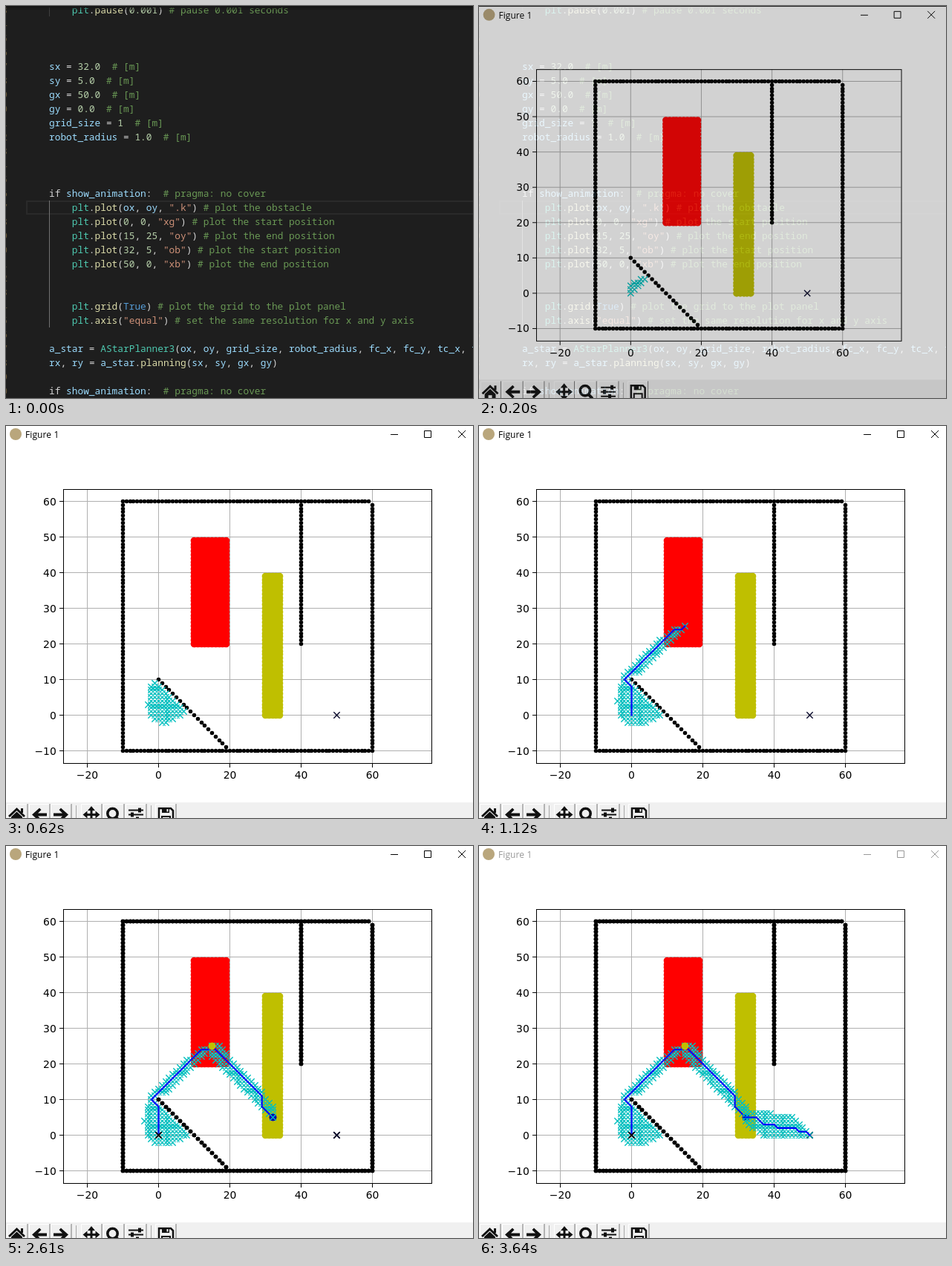
An HTML page for the animation above (3840 ms loop, 629 px wide and 528 px high).

```html
<!DOCTYPE html>
<html lang="en">
<head>
<meta charset="utf-8">
<title>Path planning</title>
<style>
html, body { margin: 0; width: 100%; height: 100%; overflow: hidden; background: #1e1e1e; }
svg { display: block; width: 629px; height: 528px; }
.code text { font: 12.82px "Noto Sans Mono", monospace; white-space: pre; }
.tick { font: 13.9px "DejaVu Sans", sans-serif; }
.title { font: 12px "Open Sans", sans-serif; letter-spacing: .1px; }
</style>
</head>
<body>
<svg id="stage" viewBox="0 0 629 528" xmlns="http://www.w3.org/2000/svg"></svg>
<script>
const LOOP = 3840;
const stage = document.getElementById('stage');

function add(parent, tag, attrs = {}, text) {
  const el = document.createElementNS('http://www.w3.org/2000/svg', tag);
  for (const k in attrs) el.setAttribute(k, attrs[k]);
  if (text !== undefined) el.textContent = text;
  parent.appendChild(el);
  return el;
}
const range = (a, b) => Array.from({ length: b - a + 1 }, (_, i) => a + i);

// ---- code editor ----
const lines = {
  '-4': '    plt.pause(0.001) # pause 0.001 seconds',
  0: 'sx = 32.0  # [m]',
  1: 'sy = 5.0  # [m]',
  2: 'gx = 50.0  # [m]',
  3: 'gy = 0.0  # [m]',
  4: 'grid_size = 1  # [m]',
  5: 'robot_radius = 1.0  # [m]',
  9: 'if show_animation:  # pragma: no cover',
  10: '    plt.plot(ox, oy, ".k") # plot the obstacle',
  11: '    plt.plot(0, 0, "xg") # plot the start position',
  12: '    plt.plot(15, 25, "oy") # plot the end position',
  13: '    plt.plot(32, 5, "ob") # plot the start position',
  14: '    plt.plot(50, 0, "xb") # plot the end position',
  17: '    plt.grid(True) # plot the grid to the plot panel',
  18: '    plt.axis("equal") # set the same resolution for x and y axis',
  20: 'a_star = AStarPlanner3(ox, oy, grid_size, robot_radius, fc_x, fc_y, tc_x, tc_y)',
  21: 'rx, ry = a_star.planning(sx, sy, gx, gy)',
  23: 'if show_animation:  # pragma: no cover'
};

function tokenColor(tok, next) {
  if (tok[0] === '#') return '#6a9955';
  if (tok[0] === '"') return '#ce9178';
  if (/^\d/.test(tok)) return '#b5cea8';
  if (tok === 'True') return '#569cd6';
  if (tok === 'plt' || tok === 'AStarPlanner3') return '#4ec9b0';
  if (tok === 'if' || !/^\w/.test(tok)) return '#d4d4d4';
  return next === '(' ? '#dcdcaa' : '#9cdcfe';
}

function buildCode() {
  const g = add(stage, 'g', { class: 'code' });
  add(g, 'rect', { width: 629, height: 528, fill: '#1e1e1e' });
  add(g, 'rect', { x: 28, y: 263, width: 620, height: 17, fill: 'none', stroke: '#2a2a2a', 'stroke-width': 2 });
  add(g, 'path', { d: 'M58.5 0V14', stroke: '#404040' });
  add(g, 'path', { d: 'M58.5 262V433', stroke: '#707070' });
  for (const r of range(-4, 23)) {
    const y = 86 + 19 * r;
    add(g, 'text', { x: 2, y, 'text-anchor': 'end', fill: '#6b5a3a' }, (r + 17) % 10);
    const src = lines[r];
    if (!src) continue;
    const indent = src.length - src.trimStart().length;
    const row = add(g, 'text', { x: 58 + indent * 7.69, y });
    for (const m of src.trim().matchAll(/#.*|"[^"]*"|[A-Za-z_]\w*|\d+(\.\d+)?|\s+|./g)) {
      const next = src.trim()[m.index + m[0].length];
      add(row, 'tspan', { fill: tokenColor(m[0], next) }, m[0]);
    }
  }
  add(g, 'rect', { width: 629, height: 2, fill: '#141414' });
  add(g, 'rect', { y: 2, width: 629, height: 3, fill: '#141414', opacity: .4 });
}

// ---- plot geometry ----
const X = x => 205.5 + 4.8 * x;
const Y = y => 389.5 - 4.8 * y;
const snap = v => Math.floor(v + 1e-6) + .5;

const walls = [
  ...range(-10, 59).map(i => [i, -10]),
  ...range(-10, 59).map(i => [60, i]),
  ...range(-10, 59).map(i => [i, 60]),
  ...range(-10, 60).map(i => [-10, i]),
  ...range(20, 60).map(i => [40, i]),
  ...range(0, 19).map(i => [i, 10 - i])
];
const block = (x0, x1, y0, y1) => range(x0, x1).flatMap(x => range(y0, y1).map(y => [x, y]));

function dots(parent, points, r, fill) {
  const d = points.map(([x, y]) =>
    `M${snap(X(x)) - r} ${snap(Y(y))}a${r} ${r} 0 1 0 ${2 * r} 0a${r} ${r} 0 1 0 ${-2 * r} 0z`).join('');
  return add(parent, 'path', { d, fill });
}
const crossPath = points => points.map(([x, y]) =>
  `M${snap(X(x)) - 4.17} ${snap(Y(y)) - 4.17}l8.34 8.34m-8.34 0l8.34 -8.34`).join('');
const crosses = (parent, points, stroke) =>
  add(parent, 'path', { d: crossPath(points), stroke, 'stroke-width': 1.39, fill: 'none' });

// ---- A* search: expanded cells in order ----
const moves = [[1, 0], [0, 1], [-1, 0], [0, -1], [-1, -1], [-1, 1], [1, -1], [1, 1]];
const key = (x, y) => x + ',' + y;
const blocked = new Set(walls.flatMap(([x, y]) =>
  [[0, 0], ...moves.slice(0, 4)].map(([dx, dy]) => key(x + dx, y + dy))));

function search([sx, sy], [gx, gy]) {
  const open = new Map([[key(sx, sy), { x: sx, y: sy, cost: 0 }]]);
  const closed = new Set();
  const order = [];
  while (open.size) {
    let best, id, low = Infinity;
    for (const [k, n] of open) {
      const f = n.cost + Math.sqrt((gx - n.x) ** 2 + (gy - n.y) ** 2);
      if (f < low) { low = f; best = n; id = k; }
    }
    order.push([best.x, best.y]);
    if (best.x === gx && best.y === gy) break;
    open.delete(id);
    closed.add(id);
    for (const [dx, dy] of moves) {
      const x = best.x + dx, y = best.y + dy, k = key(x, y);
      if (closed.has(k) || blocked.has(k) || x < -10 || y < -10 || x > 60 || y > 60) continue;
      const cost = best.cost + (dx && dy ? Math.SQRT2 : 1);
      if (!open.has(k) || open.get(k).cost > cost) open.set(k, { x, y, cost });
    }
  }
  return order;
}

// Each leg: start time, step length, steps spent searching, step that shows the path
const legs = [
  { at: 130, step: 990 / 14, grow: 13, done: 14,
    path: [[0, 0], [0, 8], [-2, 10], [12, 24], [14, 24], [15, 25]] },
  { at: 1520, step: 69, grow: 8.5, done: 10,
    path: [[15, 25], [16, 24], [29, 11], [29, 8], [32, 5]] },
  { at: 2610, step: 70, grow: 10, done: 11,
    path: [[32, 5], [35, 5], [37, 3], [40, 3], [41, 2], [46, 2], [47, 1], [49, 1], [50, 0]] }
];

function buildLegs(parent) {
  legs.forEach((leg, i) => {
    leg.group = add(parent, 'g');
    dots(leg.group, walls, 2.78, '#000');
    if (i === 0) {
      dots(leg.group, block(10, 19, 20, 49), 4.86, '#f00');
      dots(leg.group, block(30, 34, 0, 39), 4.86, '#bfbf00');
    } else {
      dots(leg.group, [[15, 25]], 4.86, '#bfbf00');
      dots(leg.group, [[32, 5]], 4.86, '#0000b4');
    }
    if (i > 0) crosses(leg.group, [[0, 0]], '#000');
    crosses(leg.group, [[50, 0]], '#08082a');
    leg.cells = search(leg.path[0], leg.path[leg.path.length - 1]);
    leg.nodes = crosses(leg.group, [], '#00bfbf');
    leg.line = add(leg.group, 'polyline', {
      points: leg.path.map(([x, y]) => X(x) + ',' + Y(y)).join(' '),
      fill: 'none', stroke: '#00f', 'stroke-width': 2.08, 'stroke-linecap': 'square', 'stroke-linejoin': 'round'
    });
  });
}

// ---- figure window ----
function buildAxes(w) {
  const label = (x, y, v, anchor) =>
    add(w, 'text', { class: 'tick', x, y, 'text-anchor': anchor }, String(v).replace('-', '\u2212'));
  const xs = range(-1, 3).map(i => i * 20), ys = range(-1, 6).map(i => i * 10);
  const grid = xs.map(x => `M${X(x)} 85V454`).join('') + ys.map(y => `M77 ${Y(y)}H573`).join('');
  const ticks = xs.map(x => `M${X(x)} 455v5`).join('') + ys.map(y => `M77 ${Y(y)}h-5`).join('');
  add(w, 'path', { d: grid, stroke: '#b0b0b0' });
  buildLegs(w);
  add(w, 'path', { d: ticks, stroke: '#000' });
  add(w, 'rect', { x: 77.5, y: 85.5, width: 496, height: 369, fill: 'none', stroke: '#000' });
  xs.forEach(x => label(X(x), 475, x, 'middle'));
  ys.forEach(y => label(67.8, Y(y) + 5, y, 'end'));
}

function buildToolbar(w) {
  add(w, 'rect', { x: -2, y: 507, width: 640, height: 60, fill: '#f0f0f0' });
  for (const x of [1, 31, 60, 101, 131, 161, 201]) {
    add(w, 'path', { d: `M${x + .5} 540V509.5H${x + 28}`, stroke: '#fff', fill: 'none' });
    add(w, 'path', { d: `M${x + 28} 509V540`, stroke: '#777' });
  }
  add(w, 'path', { d: 'M94.5 511V540M195.5 511V540', stroke: '#a8a8a8' });
  const icons = add(w, 'g', { fill: '#111' });
  const shape = (d, more) => add(icons, 'path', { d, ...more });
  const arrow = 'M35 523.5L45 514.5L47.5 517L43 521.5H55V525.5H43L47.5 530L45 532.5Z';
  const stroke = { fill: 'none', stroke: '#111', 'stroke-width': 2.5 };
  shape('M3 525L14.5 514L26 525L24 527L14.5 518L5 527ZM20 515h3v6h-3z');
  shape('M7 526.5L14.5 519.5L22 526.5V534H17V528H12V534H7Z');
  shape(arrow);
  shape(arrow, { transform: 'translate(119 0) scale(-1 1)' });
  shape('M115 512l5 6h-3.5v4h4v-3.5l6 5-6 5v-3.5h-4v4h3.5l-5 6-5-6h3.5v-4h-4v3.5l-6-5 6-5v3.5h4v-4h-3.5z');
  add(icons, 'circle', { cx: 143.5, cy: 522, r: 6.7, ...stroke, 'stroke-width': 3.6 });
  shape('M148 527l5.5 5.5', { ...stroke, 'stroke-width': 4 });
  shape('M165 517.5H185M165 523.5H185M165 529.5H185', { ...stroke, 'stroke-width': 2 });
  shape('M178 514.5h4v6h-4zM168 520.5h4v6h-4zM175 526.5h4v6h-4z');
  shape('M206 515H222L225 518V533H206Z', stroke);
  shape('M210 515h10v6h-10zM209 525h13v8h-13z');
  shape('M216.5 516h2v3.5h-2zM211 527h9v5h-9z', { fill: '#f0f0f0' });
}

function buildWindow() {
  const w = add(stage, 'g');
  add(w, 'rect', { x: -2, width: 640, height: 600, fill: '#fff' });
  add(w, 'circle', { cx: 13, cy: 11, r: 8, fill: '#b9a67c' });
  w.caption = add(w, 'text', { class: 'title', x: 26, y: 16 }, 'Figure 1');
  w.buttons = add(w, 'path', { d: 'M518 11.5h10M563.5 6.5h9v9h-9zM609 6l10 10m0 -10l-10 10', fill: 'none' });
  buildAxes(w);
  buildToolbar(w);
  return w;
}

buildCode();
const win = buildWindow();

// Opening of the window: time, opacity, scale
const opening = [[0, 0, .98], [130, .59, .98], [200, .8, .991], [270, .933, .9975], [340, .985, .9995], [410, 1, 1]];
const show = (el, on) => el.setAttribute('visibility', on ? 'visible' : 'hidden');

function render(t) {
  const [, alpha, s] = opening.filter(o => t >= o[0]).pop();
  win.setAttribute('opacity', alpha);
  win.setAttribute('transform', `translate(${75 * (1 - s)} ${100 * (1 - s)}) scale(${s})`);
  const ink = t >= 3640 ? '#999' : '#000';
  win.caption.setAttribute('fill', ink);
  win.buttons.setAttribute('stroke', ink);

  for (const leg of legs) {
    const on = t >= leg.at;
    leg.group.setAttribute('display', on ? 'inline' : 'none');
    if (!on) continue;
    const k = Math.floor((t - leg.at) / leg.step + .1);
    const total = leg.cells.length;
    const count = k >= leg.grow ? total : 1 + 10 * Math.floor((total - 1) * k / leg.grow / 10);
    if (leg.count !== count) {
      leg.count = count;
      leg.nodes.setAttribute('d', crossPath(leg.cells.slice(0, count)));
    }
    show(leg.line, k >= leg.done);
  }
  legs[0].nodes.setAttribute('stroke', t < 200 ? '#8a8a8a' : '#00bfbf');
}

const start = performance.now();
function tick() {
  render((performance.now() - start) % LOOP);
  requestAnimationFrame(tick);
}
tick();
</script>
</body>
</html>
```
